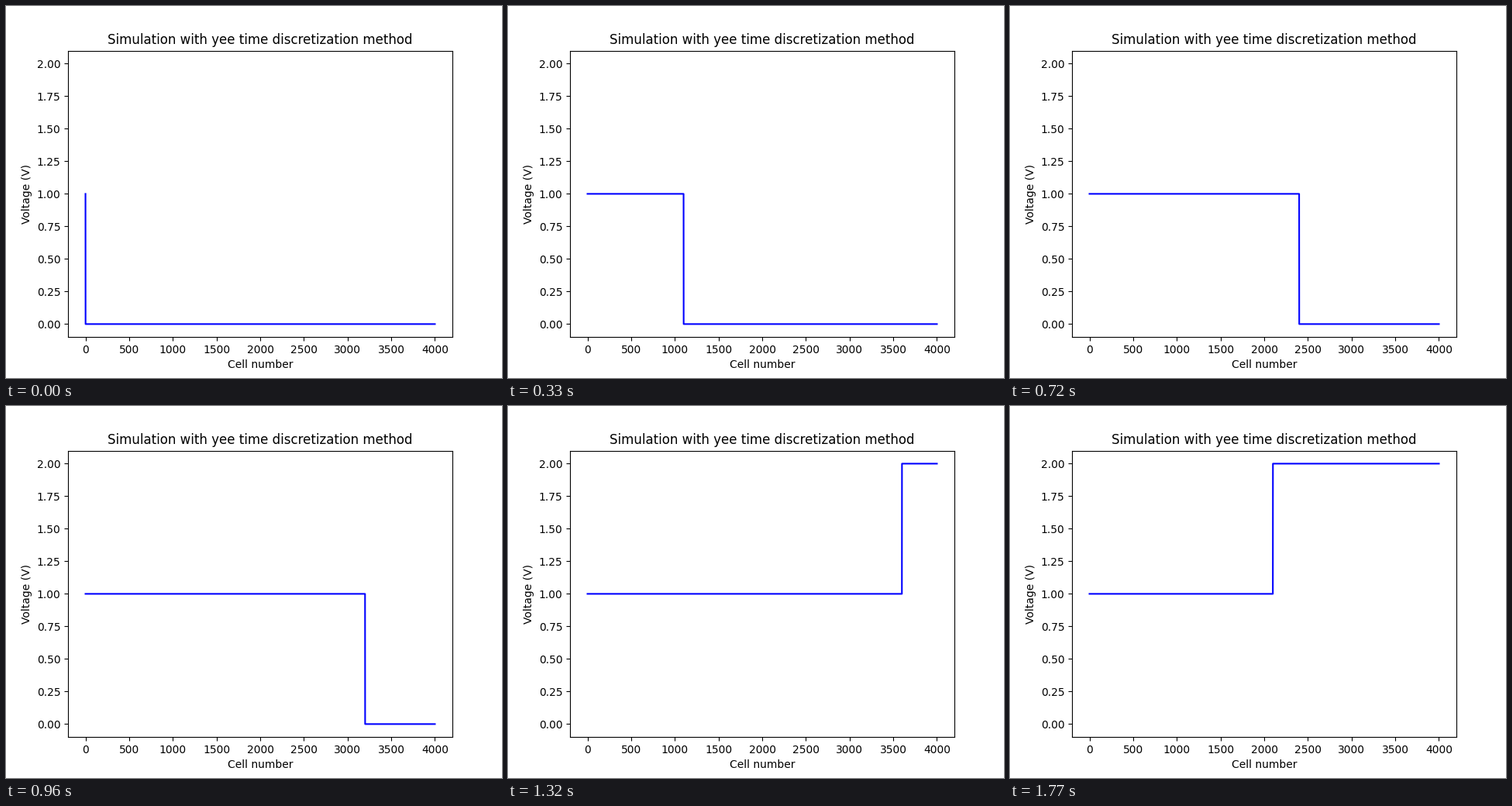
A matplotlib script for the animation above (1.8 s loop, 640 by 480 pixels).

```python
import numpy as np
import matplotlib.pyplot as plt
from matplotlib.animation import FuncAnimation

CELLS = 4000
FRAMES = 60
CELLS_PER_FRAME = 100

cells = np.arange(CELLS + 1)


def voltage(step):
    """Unit step travelling right, then doubling back from the open end."""
    incident = cells <= step
    reflected = cells >= 2 * CELLS - step
    return incident.astype(float) + reflected


fig, ax = plt.subplots(figsize=(6.4, 4.8), dpi=100)
line, = ax.plot(cells, voltage(0), color="blue", linewidth=1.5)
margin = 0.05 * CELLS
ax.set_xlim(-margin, CELLS + margin)
ax.set_ylim(-0.1, 2.1)
ax.set_title("Simulation with yee time discretization method")
ax.set_xlabel("Cell number")
ax.set_ylabel("Voltage (V)")


def update(frame):
    line.set_ydata(voltage(frame * CELLS_PER_FRAME))
    return line,


anim = FuncAnimation(fig, update, frames=FRAMES, interval=30, repeat=True,
                     repeat_delay=0)
plt.show()
```
